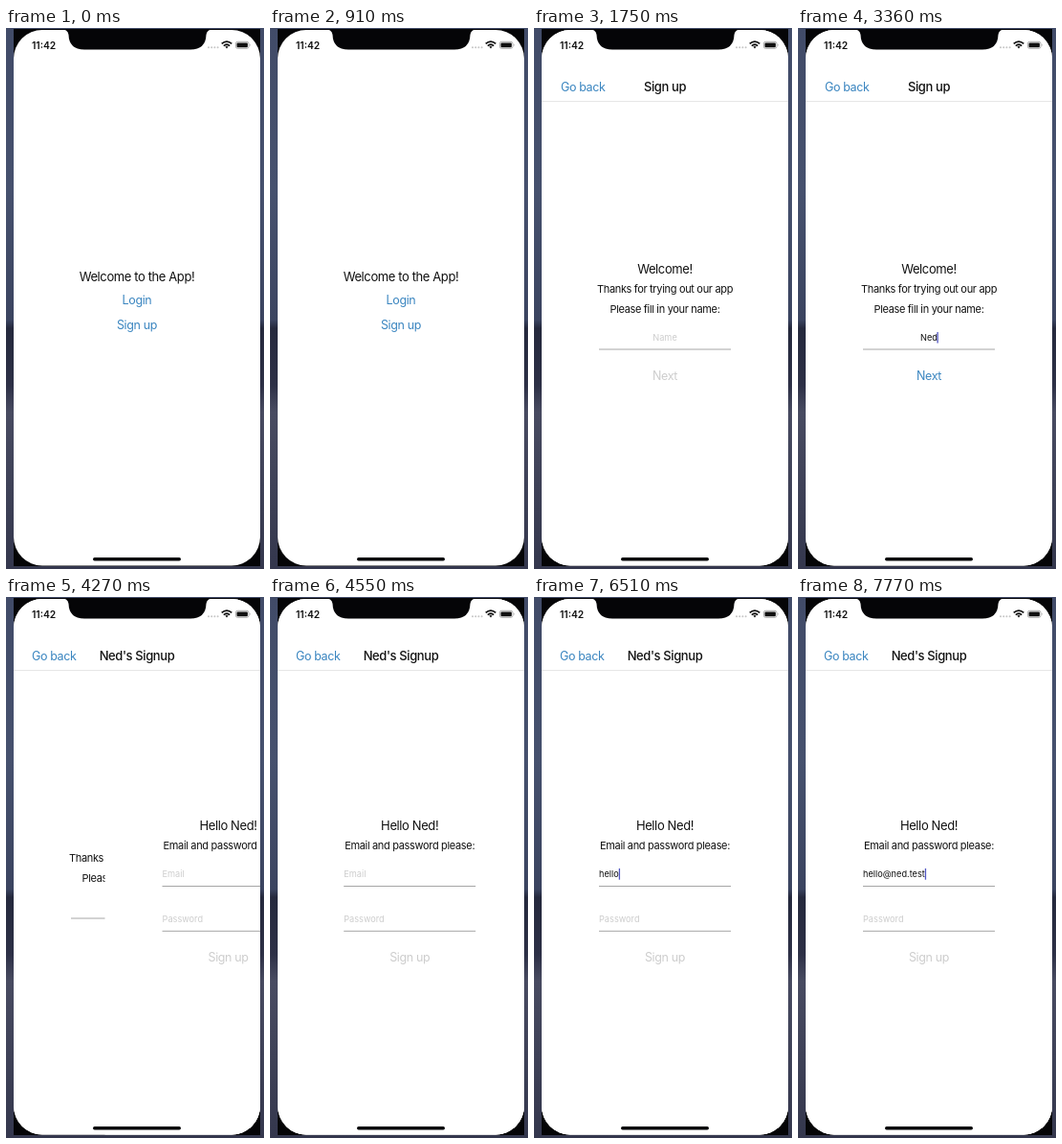
Write an HTML page that moves like this. It is 270x564 px and loops after 8000 ms.

```html
<!DOCTYPE html>
<html lang="en">
<head>
<meta charset="utf-8">
<title>Sign up flow</title>
<style>
  html, body { margin: 0; width: 100%; height: 100%; overflow: hidden; background: #333b55; }
  svg { display: block; width: 100%; height: 100%; }
  text { font-family: Inter, Roboto, sans-serif; fill: #111; white-space: pre; }
  .mid { text-anchor: middle; }
  .big { font-size: 13px; letter-spacing: -.03em; }
  .body { font-size: 11px; letter-spacing: -.03em; }
  .link { font-size: 12.5px; letter-spacing: -.03em; fill: #3b86c0; }
  .field { font-size: 9.2px; }
  .title { font-weight: 500; }
  .off { fill: #cdcdcd; }
  .rule { stroke: #a6a6a6; stroke-width: 1; }
  .bar { stroke: #e6e6e6; stroke-width: 1; }
  .caret { fill: #5257c4; }
</style>
</head>
<body>
<svg viewBox="0 0 270 564" preserveAspectRatio="none">
  <defs>
    <linearGradient id="wall" x1="0" y1="0" x2="0" y2="1">
      <stop offset="0" stop-color="#414b68"/>
      <stop offset=".3" stop-color="#46516e"/>
      <stop offset=".54" stop-color="#3b4460"/>
      <stop offset=".555" stop-color="#25293d"/>
      <stop offset=".66" stop-color="#2d3046"/>
      <stop offset=".71" stop-color="#484b61"/>
      <stop offset="1" stop-color="#34374d"/>
    </linearGradient>
    <clipPath id="screen"><rect x="8" y="2" width="258" height="558.5" rx="30"/></clipPath>
    <clipPath id="below"><rect x="8" y="77" width="258" height="484"/></clipPath>
  </defs>

  <rect width="270" height="564" fill="url(#wall)"/>
  <rect x="8" y="1" width="258" height="560" fill="#050507"/>

  <g clip-path="url(#screen)">
    <rect x="8" y="2" width="258" height="559" fill="#fff"/>

    <g id="home">
      <text class="mid big" x="137" y="263.5">Welcome to the App!</text>
      <text class="mid link" x="137" y="288.3">Login</text>
      <text class="mid link" id="join" x="137" y="314.2">Sign up</text>
    </g>

    <g id="first">
      <rect x="8" y="2" width="258" height="559" fill="#fff"/>
      <text class="link" id="back" x="28" y="65.7">Go back</text>
      <text class="mid big title" id="title" x="137" y="65.9"></text>
      <path class="bar" d="M8 76.5H266"/>
      <text class="mid big" x="137" y="255.5">Welcome!</text>
      <text class="mid body" x="137" y="276.4">Thanks for trying out our app</text>
      <text class="mid body" x="137" y="296.6">Please fill in your name:</text>
      <text class="mid field" id="name" x="137" y="325.7"></text>
      <rect class="caret" id="nameCaret" y="317" width="1.3" height="11.5"/>
      <path class="rule" d="M68 335H206"/>
      <text class="mid link" id="next" x="137" y="366.7">Next</text>
    </g>

    <g clip-path="url(#below)">
      <g id="second">
        <rect x="8" y="77" width="258" height="484" fill="#fff"/>
        <text class="mid big" x="137" y="242.5">Hello Ned!</text>
        <text class="mid body" x="137" y="263.2">Email and password please:</text>
        <text class="field" id="email" x="68" y="292.2"></text>
        <rect class="caret" id="emailCaret" y="283" width="1.3" height="11.7"/>
        <path class="rule" d="M68 301.5H206"/>
        <text class="field off" x="68" y="338.8">Password</text>
        <path class="rule" d="M68 348.3H206"/>
        <text class="mid link off" x="137" y="379.8">Sign up</text>
      </g>
    </g>
  </g>

  <path d="M56 1Q65 1 65.5 7Q66 22.5 82 22.5H193Q209 22.5 209.5 7Q210 1 219 1Z" fill="#050507"/>
  <text x="27" y="21.6" font-size="10.3" font-weight="600">11:42</text>
  <g fill="#c6c6c6">
    <circle cx="212" cy="20.3" r="1"/><circle cx="215.2" cy="20.3" r="1"/>
    <circle cx="218.4" cy="20.3" r="1"/><circle cx="221.6" cy="20.3" r="1"/>
  </g>
  <g fill="none" stroke="#111" stroke-width="1.7">
    <path d="M225.7 16.4Q231 11.8 236.3 16.4M227.8 18.6Q231 15.9 234.2 18.6"/>
    <path d="M229.4 19.6L231 21.4L232.6 19.6Q231 18.4 229.4 19.6Z" fill="#111" stroke="none"/>
  </g>
  <rect x="240.4" y="14.3" width="13.6" height="7" rx="2" fill="none" stroke="#999" stroke-width=".8"/>
  <rect x="241.5" y="15.4" width="11.4" height="4.8" rx="1" fill="#111"/>
  <path d="M255 16.5Q256.4 17.8 255 19.1Z" fill="#999"/>
  <rect x="91" y="552" width="92" height="3.4" rx="1.7" fill="#050507"/>
</svg>

<script>
const LOOP = 8000, WIDTH = 258, SLIDE = 720;
const OPEN_FIRST = 970, OPEN_SECOND = 4068;
const NAME = "Ned", NAME_KEYS = [2660, 2870, 3080];
const EMAIL = "hello@ned.test";
const EMAIL_KEYS = [6020, 6160, 6300, 6400, 6510, 6860, 6960, 7050, 7150, 7350, 7450, 7550, 7640, 7740];

const el = id => document.getElementById(id);
const clamp = v => Math.max(0, Math.min(1, v));
const within = (t, a, b) => t >= a && t < b;

// Card offset from its resting place, easing out.
const offset = (t, start) => WIDTH * (1 - clamp((t - start) / SLIDE)) ** 3;

// Opacity of a touched link.
const touch = (t, down, up) =>
  1 - .8 * clamp((t - down) / 100) * (1 - clamp((t - up) / 150));

function slide(id, t, start) {
  el(id).setAttribute("display", t < start ? "none" : "inline");
  el(id).setAttribute("transform", `translate(${offset(t, start)} 0)`);
}

function type(id, t, value, keys, hint) {
  const node = el(id);
  const typed = value.slice(0, keys.filter(k => k <= t).length);
  node.textContent = typed || hint;
  node.classList.toggle("off", !typed);
  return typed ? node.getComputedTextLength() : 0;
}

function caret(id, x, on) {
  el(id).setAttribute("x", x);
  el(id).setAttribute("opacity", on ? 1 : 0);
}

function draw(t) {
  const later = t >= OPEN_SECOND;
  slide("first", t, OPEN_FIRST);
  slide("second", t, OPEN_SECOND);
  el("title").textContent = later ? NAME + "'s Signup" : "Sign up";
  el("back").setAttribute("x", later ? 27 : 28);
  el("join").setAttribute("opacity", touch(t, 915, 1010));

  const nameWidth = type("name", t, NAME, NAME_KEYS, "Name");
  caret("nameCaret", 136.5 + nameWidth / 2, within(t, 2100, 2310) || within(t, 2660, OPEN_SECOND));
  el("next").classList.toggle("off", !nameWidth);
  el("next").setAttribute("opacity", touch(t, 3560, 3800));

  const emailWidth = type("email", t, EMAIL, EMAIL_KEYS, "Email");
  caret("emailCaret", 68 + emailWidth, within(t, 5110, 5600) || t >= 6020);
}

const begin = performance.now();
function tick() {
  draw((performance.now() - begin) % LOOP);
  requestAnimationFrame(tick);
}
tick();
</script>
</body>
</html>
```
